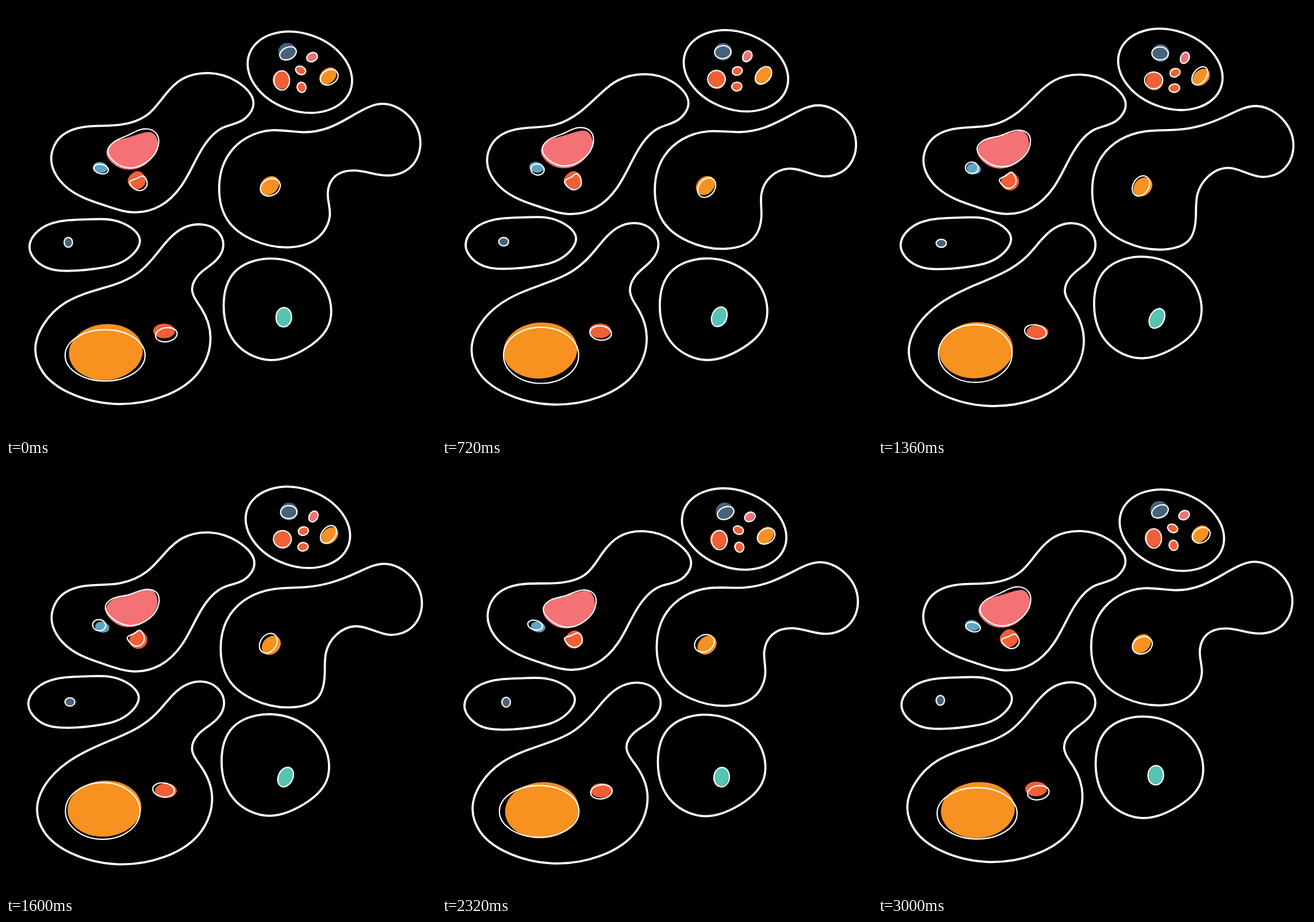
These frames come from a looping animation (748x748 px, 3040 ms). An HTML page with a canvas:

```html
<!DOCTYPE html>
<html lang="en">
<head>
<meta charset="utf-8">
<title>Drifting cells</title>
<style>
html, body { margin: 0; width: 100%; height: 100%; overflow: hidden; background: #000; }
canvas { display: block; width: 748px; height: 748px; }
</style>
</head>
<body>
<canvas id="stage" width="748" height="748"></canvas>
<script>
const LOOP = 3040, STEP = 40, PERIOD = 3000, LAG = 0.08;
const ORANGE = '#f79220', PINK = '#f47175', RED = '#f15f36';
const BLUE = '#5fa3c6', NAVY = '#47627a', TEAL = '#56c3b3';
const RAD = Math.PI / 180;
const ctx = document.getElementById('stage').getContext('2d');
const layers = [];
let angle = 0;

const wave = deg => Math.cos(angle - deg * RAD);

// Moves a point along an ellipse: cosine part (ax, ay), sine part (bx, by).
const orbit = ([x, y], [ax, ay, bx, by], weight = 1) => [
  x + weight * (ax * wave(0) + bx * wave(90)),
  y + weight * (ay * wave(0) + by * wave(90))
];

// Slope at each point of a closed cubic spline with even curvature.
function slopes(vals, gaps) {
  const n = vals.length, m = vals.map(() => 0);
  for (let pass = 0; pass < 10; pass++) {
    for (let i = 0; i < n; i++) {
      const j = (i + n - 1) % n, k = (i + 1) % n, g = gaps[j], h = gaps[i];
      const rise = 3 * (h * (vals[i] - vals[j]) / g + g * (vals[k] - vals[i]) / h);
      m[i] = (rise - h * m[j] - g * m[k]) / (2 * (g + h));
    }
  }
  return m;
}

function spline(pts) {
  const n = pts.length;
  const xs = pts.map(p => p[0]), ys = pts.map(p => p[1]);
  const gaps = pts.map((p, i) =>
    Math.hypot(xs[(i + 1) % n] - p[0], ys[(i + 1) % n] - p[1]));
  const mx = slopes(xs, gaps), my = slopes(ys, gaps);
  ctx.beginPath();
  ctx.moveTo(xs[0], ys[0]);
  for (let i = 0; i < n; i++) {
    const k = (i + 1) % n, h = gaps[i] / 3;
    ctx.bezierCurveTo(xs[i] + mx[i] * h, ys[i] + my[i] * h,
      xs[k] - mx[k] * h, ys[k] - my[k] * h, xs[k], ys[k]);
  }
  ctx.closePath();
}

function oval(x, y, rx, ry, tilt) {
  ctx.beginPath();
  ctx.ellipse(x, y, rx, ry, tilt * RAD, 0, 2 * Math.PI);
}

function fill(color, path) {
  layers.push(() => { path(); ctx.fillStyle = color; ctx.fill(); });
}
function line(width, path) {
  layers.push(() => { path(); ctx.lineWidth = width; ctx.stroke(); });
}
const cell = path => line(3.8, path);
const rim = path => line(2.2, path);

// An outline that drifts as a whole; each bend pulls the points near it further.
const soft = (pts, drift, ...bends) => () => spline(pts.map(p =>
  bends.reduce((q, [x, y, reach, ...pull]) => {
    const far = Math.hypot(p[0] - x, p[1] - y) / reach;
    return orbit(q, pull, Math.exp(-far * far));
  }, orbit(p, drift))));

// Glides to and fro on the diagonal.
const glide = (size, deg) => [1, 1, 0, 0].map((_, i) =>
  size * (i < 2 ? Math.cos(deg * RAD) : Math.sin(deg * RAD)) * Math.SQRT1_2 * Math.SQRT2 * 0.8);

// An oval squeezed in time along one axis.
function squashed(x, y, rx, ry, tilt, axis) {
  const mean = (rx + ry) / 2, diff = (rx - ry) / 2;
  const push = (0.6 + 0.045 * mean) * wave(-40);
  const u = diff * Math.cos(2 * tilt * RAD) + push * Math.cos(2 * axis * RAD);
  const v = diff * Math.sin(2 * tilt * RAD) + push * Math.sin(2 * axis * RAD);
  const d = Math.hypot(u, v);
  oval(x, y, mean + d, mean - d, Math.atan2(v, u) / 2 / RAD);
}

// A coloured body with a loose rim that glides at its own phase.
function nucleus(color, [x, y, rx, ry, tilt], rimPhase, axis, own = {}) {
  const o = { dx: 0, dy: 0, rx: rx - 0.3, ry: ry - 0.3, tilt, phase: 222, ...own };
  fill(color, () => oval(...orbit([x, y], glide(2.5, o.phase)), rx, ry, tilt));
  rim(() => squashed(...orbit([x + o.dx, y + o.dy], glide(3.2, rimPhase)),
    o.rx, o.ry, o.tilt, axis));
}

// Upper left cell
cell(soft([
  [353, 118], [402, 133], [431, 172], [414, 199], [378, 213], [343, 247],
  [306, 313], [268, 349], [222, 360], [172, 348], [105, 316], [79, 269],
  [94, 230], [133, 212], [198, 207], [246, 187], [277, 154], [307, 128]
], [-.3, -1, -.5, 2], [246, 187, 50, 1, 2, -3.5, -6.5], [410, 165, 65, -.5, -1, -2, -4.5]));
fill(PINK, soft([[254, 220], [264, 240], [255, 262], [235, 279], [211, 284],
  [185, 273], [174, 254], [183, 238], [207, 229], [234, 221]], glide(2.5, 285)));
rim(soft([[245, 215.5], [262, 223], [265, 243], [249, 268], [216, 281],
  [186, 269], [175, 250], [185, 236], [212, 226]
], [0, 0, -2, -3], [180, 255, 35, 2.5, 2, 1, 1.5], [230, 217, 35, -1, -2.5, -1, -1]));
nucleus(BLUE, [165.8, 282.2, 12.5, 9.3, 12], 53, 15, { dx: -1.9 });
fill(RED, soft([[230, 288.5], [242, 296], [244, 308], [231, 320], [217, 315],
  [213, 304], [218, 295]], glide(2, 217)));
rim(soft([[235, 292.5], [242, 301], [241.5, 312], [230, 319], [217, 312],
  [213, 304], [225, 297.5]], [2, 2, 0, .5], [240, 297, 15, 1, 1.5, -1.5, -2]));

// Top right cell
cell(() => oval(...orbit([509.6, 112.6], [1.7, 2.5, 1.5, -.3]), 93.4, 67.2, 19.5));
nucleus(NAVY, [490.6, 81, 15.5, 15.3, 0], 257, -45,
  { dx: .4, dy: 1.8, rx: 14.5, ry: 11, tilt: -16 });
nucleus(PINK, [533.4, 89.9, 9.9, 8, -48], 245, 6);
nucleus(RED, [514.9, 114.3, 9, 7.6, 3], 201, 45);
nucleus(RED, [480, 129.8, 14.9, 16, 0], 259, 90);
nucleus(RED, [515.2, 142.5, 8.7, 8.3, 0], 242, 80);
nucleus(ORANGE, [561.4, 123, 17, 12.5, -45], 287, 18);

// Right cell
cell(soft([
  [657, 172], [701, 192.5], [722, 239], [706, 281], [666, 296], [607, 284],
  [573, 297], [558, 326], [558.5, 365], [542, 405], [496, 421.5], [431, 409],
  [390, 379], [372, 317], [389, 259.5], [420, 231], [464, 217], [520, 217],
  [562, 209.5], [610, 188]
], [-1.3, -1.8, -1.6, 1], [620, 290, 35, 0, 4, -2, -3], [560, 360, 40, 6, 0, -2, 0],
  [540, 215, 60, 0, 5, 0, 1]));
nucleus(ORANGE, [459.8, 313.8, 18.4, 14.6, -45], 49, 10, { dx: -1.5 });

// Left cell
cell(soft([
  [142, 370], [201, 376], [232, 406], [211, 438], [167, 454], [110, 459.5],
  [61, 449.5], [40, 418.5], [55, 390], [90, 374]
], [1, 1, 1, -2.5]));
nucleus(NAVY, [109.6, 412.3, 8.3, 8.1, 0], 238, 90);

// Lower left cell
cell(soft([
  [339, 379], [368, 391], [378.5, 416.5], [366, 443], [335, 469], [324, 493.5],
  [340.5, 527.5], [357, 578], [338, 637], [275, 681], [190, 694], [112, 675],
  [66, 639.5], [52.5, 601], [67, 555.5], [105, 517.5], [172, 487], [230, 461],
  [259.5, 435], [283, 407.5], [307, 387]
], [-1.5, -2, -.8, -.7], [205, 470, 65, 0, 7, 0, -1.5], [328, 500, 45, 1.5, 1, 4, 3],
  [345, 395, 55, 1.5, 3, -2, -.8]));
nucleus(ORANGE, [172.3, 600.6, 64.3, 48.7, -5], 38, 0,
  { dx: -1.8, dy: 5.2, rx: 67, ry: 47.2, tilt: 0, phase: 310 });
nucleus(RED, [276.4, 566.6, 19, 12.7, 0], 343, -45, { dy: 2.7 });

// Lower right cell
cell(soft([
  [456, 437.5], [515, 452], [557, 496], [560, 552], [513, 598], [457.5, 614],
  [402, 589], [377, 520], [396, 461]
], [1.8, 2, 1.6, 1.5]));
nucleus(TEAL, [484.6, 542.8, 17.5, 13.4, -72], 233, 45);

function draw(now) {
  const t = Math.floor(now % LOOP / STEP) * STEP;
  angle = 2 * Math.PI * t / PERIOD - LAG;
  ctx.fillStyle = '#000';
  ctx.fillRect(0, 0, 748, 748);
  ctx.strokeStyle = '#fff';
  ctx.lineJoin = 'round';
  layers.forEach(paint => paint());
}

const start = performance.now();
function tick() {
  draw(performance.now() - start);
  requestAnimationFrame(tick);
}
tick();
</script>
</body>
</html>
```
